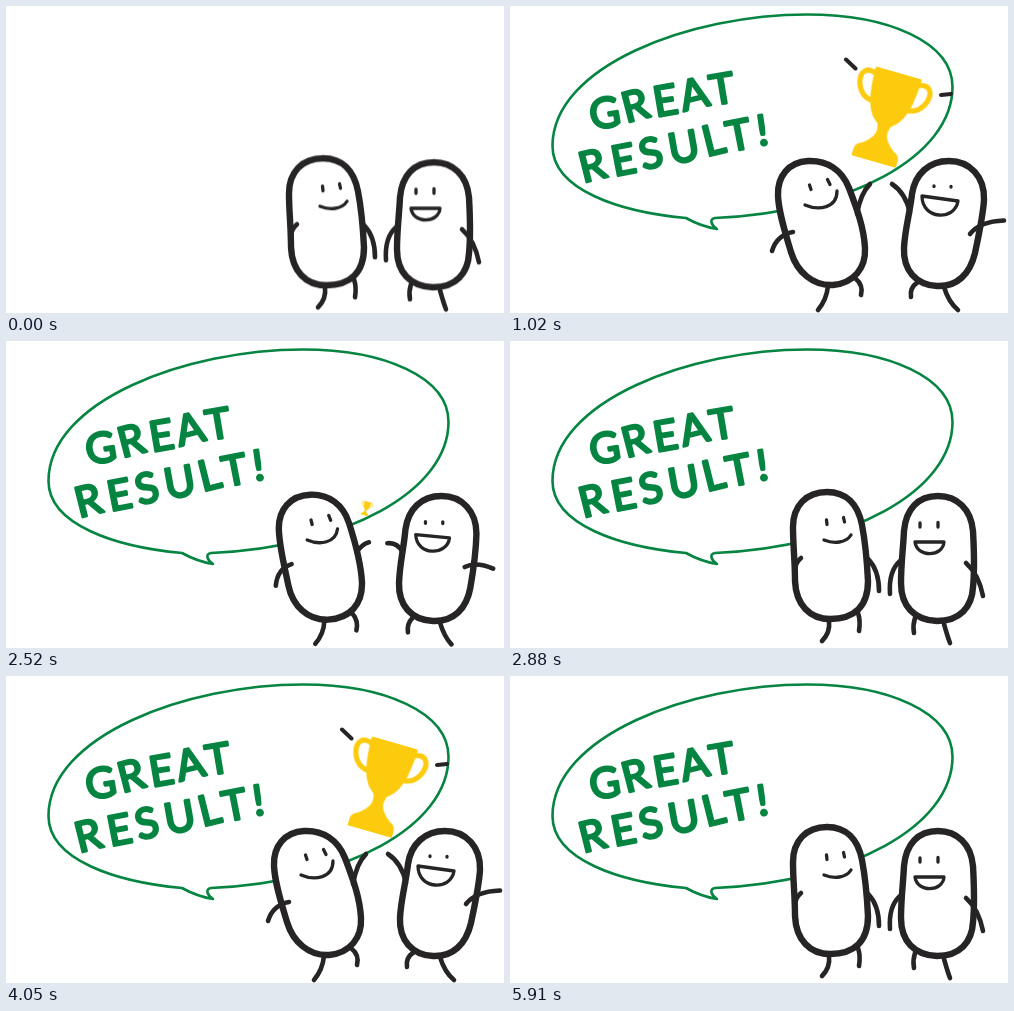
Recreate the animation shown at these times as an HTML page. Size 498x307 px, loop 6060 ms.

```html
<!DOCTYPE html>
<html lang="en">
<head>
<meta charset="utf-8">
<title>Great result!</title>
<style>
html, body { margin: 0; width: 100%; height: 100%; overflow: hidden; background: #fff; }
svg { display: block; width: 498px; height: 307px; }

.bubble {
  fill: none; stroke: #068441; stroke-width: 2.6; stroke-linejoin: round;
  transform-origin: 205px 222px;
  animation: pop 6060ms infinite;
}
.bubble text {
  font: 400 42px Lato, "Open Sans", sans-serif; letter-spacing: 4px;
  fill: #068441; stroke-width: 2.6;
}
.bubble .wide { letter-spacing: 5.5px; }

.trophy {
  fill: #fdcb0e;
  transform-origin: 0 115px;
  animation: lift 3030ms infinite;
}
.trophy .handle { fill: none; stroke: #fdcb0e; stroke-width: 5.2; }

.sparks { animation: show 3030ms infinite; }
.sparks path {
  fill: none; stroke: #262424; stroke-width: 4; stroke-linecap: round;
  stroke-dasharray: 1 2;
  animation: shoot 505ms -192ms linear infinite;
}
.sparks .late { animation-delay: -445ms; }

.pair {
  fill: none; stroke: #262424; stroke-width: 4.6;
  stroke-linecap: round; stroke-linejoin: round;
  animation: settle 6060ms step-end infinite;
}
.pair path { d: var(--rest); animation: cheer 3030ms infinite; }
.pair .body { fill: #fff; stroke-width: 6.4; }
.pair .face { stroke-width: 3.3; }

@keyframes cheer {
  0%, 1.5% { d: var(--rest); animation-timing-function: ease-in-out; }
  20.5%, 75.5% { d: var(--up); animation-timing-function: ease-in-out; }
  95%, 100% { d: var(--rest); }
}
@keyframes pop {
  0%, .4% { transform: scale(0); animation-timing-function: ease-out; }
  6%, 100% { transform: none; }
}
@keyframes lift {
  0%, 8% { transform: scale(0); animation-timing-function: ease-out; }
  24%, 75.5% { transform: none; animation-timing-function: ease-in; }
  84%, 100% { transform: scale(0); }
}
@keyframes show {
  0%, 21.9% { visibility: hidden; }
  22%, 72.4% { visibility: visible; }
  72.5%, 100% { visibility: hidden; }
}
@keyframes shoot {
  0% { stroke-dashoffset: 1.1; }
  36%, 44% { stroke-dashoffset: 0; }
  80%, 100% { stroke-dashoffset: -1.1; }
}
@keyframes settle {
  0% { transform: translateY(1.3px); }
  .5%, 100% { transform: none; }
}
</style>
</head>
<body>
<svg viewBox="0 0 498 307">
  <g class="bubble">
    <path d="M176 212C110 206 42.500 184 42.500 140C42.500 60 180 8.500 297 8.500C378 8.500 442.500 36 442.500 81C442.500 150 340 206 205 212C199 213 201 219 207 223C195 221 185 217 176 212Z"/>
    <text transform="translate(82 124) rotate(-11.500)" rotate="2 -3 2 -2 2">GREAT</text>
    <text class="wide" transform="translate(73 177) rotate(-12)" rotate="-2 1 -2 2 -2 1 4">RESULT!</text>
  </g>

  <g transform="translate(389 67) rotate(16)">
    <g class="trophy">
      <path d="M-23 0H23Q24 0 24 2C23 30 19 46 7 54Q4 61 7 67Q12 75 20 79Q23 81 23 86V92H-23V86Q-23 81 -20 79Q-12 75 -7 67Q-4 61 -7 54C-19 46 -23 30 -24 2Q-24 0 -23 0Z"/>
      <path class="handle" d="M-22 7C-33 2 -38 10 -35 20C-32 29 -26 33 -19 34M22 7C33 2 38 10 35 20C32 29 26 33 19 34"/>
    </g>
  </g>

  <g class="sparks">
    <path pathLength="1" d="M345.500 62.500L336 53.500"/>
    <path pathLength="1" d="M431 89L441 88"/>
    <path class="late" pathLength="1" d="M313 118L300 120"/>
    <path class="late" pathLength="1" d="M334 175L323 182"/>
    <path class="late" pathLength="1" d="M440 125L451 130"/>
  </g>

  <g class="pair">
    <!-- left friend -->
    <path style="--rest:path('M319 280C320 288 317 295 312 300');--up:path('M318 280C317 290 313 298 308 304')"/>
    <path style="--rest:path('M348 272C350 278 350 284 349 290');--up:path('M345 272C351 277 353 282 351 289')"/>
    <path class="body" style="--rest:path('M317 151C296 151 283 165 283 186C283 205 285 220 285 240C286 264 300 278 320 278C344 278 358 266 358 240C357 220 356 205 352 184C348 163 336 151 317 151Z');--up:path('M298 155C279 156 267 170 268 190C269 208 275 226 281 246C287 266 303 280 323 279C344 277 356 262 355 242C354 222 347 203 339 182C332 164 317 154 298 155Z')"/>
    <path style="--rest:path('M291 217C285 222 283 232 286 244');--up:path('M283 226C272 228 265 235 262 245')"/>
    <path style="--rest:path('M358 218C366 226 369 238 369 250');--up:path('M347 208C349 196 353 185 360 178')"/>
    <path class="face" style="--rest:path('M316.500 179L317 183.500M333.500 176.500L334.500 181');--up:path('M299.500 179L301 183.500M317.500 173.500L320 178.500')"/>
    <path class="face" style="--rest:path('M314 199C324 203 336 202 341 194');--up:path('M295 199C309 205 327 202 327 185')"/>

    <!-- right friend -->
    <path style="--rest:path('M405 277C403 283 403 287 404 292');--up:path('M408 276C402 280 400 285 401 291')"/>
    <path style="--rest:path('M434 283C436 290 438 297 440 302');--up:path('M434 281C437 291 442 299 448 304')"/>
    <path class="body" style="--rest:path('M428 155C408 155 396 168 394 190C393 210 391 222 391 242C391 265 404 279 427 280C450 280 462 266 463 246C465 226 464 208 463 190C461 168 447 155 428 155Z');--up:path('M439 155C419 155 405 168 402 188C400 207 395 222 394 242C393 264 406 279 427 280C447 281 460 268 465 247C469 228 473 210 474 194C475 171 460 155 439 155Z')"/>
    <path style="--rest:path('M390 220C383 226 379 238 380 253');--up:path('M400 207C397 193 391 184 382 178')"/>
    <path style="--rest:path('M456 222C464 229 470 240 473 255');--up:path('M460 228C467 219 480 215 494 214.500')"/>
    <path class="face" style="--rest:path('M410 182L410 186M428 181.500L428 186');--up:path('M424 180L424 180.500M441 180.500L441 181')"/>
    <path class="face" style="--rest:path('M405 201L434 201C433 216 407 217 405 201Z');--up:path('M412 190L448 195C445 215 412 214 412 190Z')"/>
  </g>
</svg>
</body>
</html>
```
